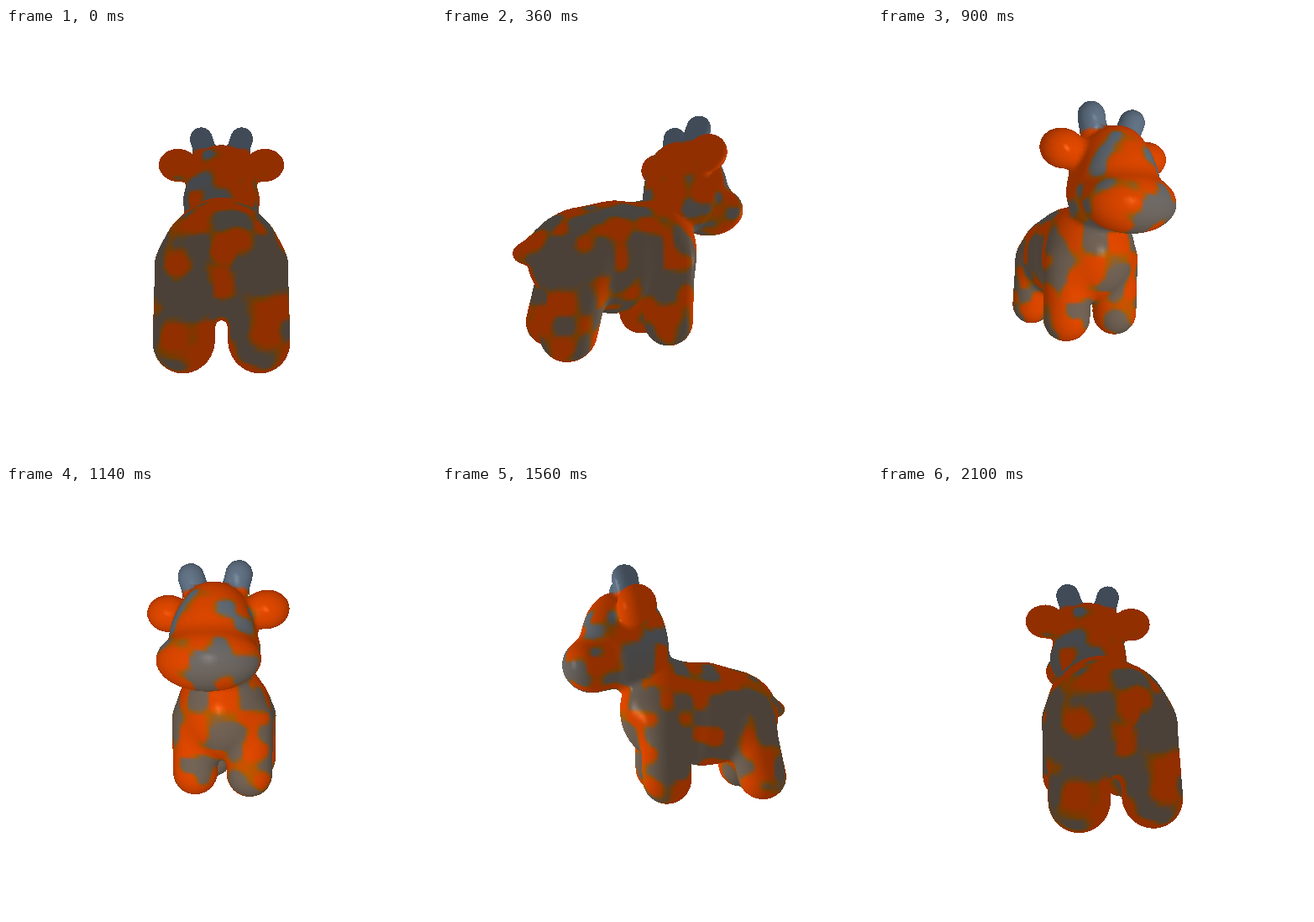
An HTML page with a canvas that plays this animation: 512 by 512 pixels, repeating every 2.16 s.

```html
<!DOCTYPE html>
<html lang="en">
<head>
<meta charset="utf-8">
<title>Turning cow</title>
<style>
html, body { margin: 0; width: 100%; height: 100%; overflow: hidden; background: #fff; }
canvas { display: block; width: 512px; height: 512px; }
</style>
</head>
<body>
<canvas id="stage" width="512" height="512"></canvas>
<script>
const SIZE = 512, MID = 256, FOCAL = 443.4, DIST = 2.7;
const STEP_MS = 60, STEPS = 36;
const { sin, cos, sqrt, abs, min, max, floor, ceil, hypot, PI } = Math;

// Distance to an ellipsoid at height cy and depth cz; cx moves it sideways.
function ball(cy, cz, rx, ry, rz, cx = 0) {
  return (x, y, z) => {
    const a = (x - cx) / rx, b = (y - cy) / ry, c = (z - cz) / rz;
    const k = sqrt(a * a + b * b + c * c);
    const u = a / rx, v = b / ry, w = c / rz;
    return k * (k - 1) / (sqrt(u * u + v * v + w * w) + 1e-9);
  };
}

// Distance to a round rod between two points.
function rod([ax, ay, az], [bx, by, bz], r) {
  const ux = bx - ax, uy = by - ay, uz = bz - az;
  const len2 = ux * ux + uy * uy + uz * uz;
  return (x, y, z) => {
    const px = x - ax, py = y - ay, pz = z - az;
    const t = max(0, min(1, (px * ux + py * uy + pz * uz) / len2));
    const dx = px - ux * t, dy = py - uy * t, dz = pz - uz * t;
    return sqrt(dx * dx + dy * dy + dz * dz) - r;
  };
}

const leg = (hip, foot) => rod([.205, -.14, hip], [.2, -.52, foot], .165);

// x to the cow's right, y up, z towards the nose; the shape is mirrored in x.
const rump = ball(-.1, -.52, .355, .34, .38);
const waist = ball(-.09, -.33, .35, .38, .35);
const chest = ball(-.06, -.07, .34, .37, .34);
const neck = ball(.35, .12, .24, .25, .2);
const skull = ball(.5, .21, .26, .26, .26);
const brow = ball(.55, .31, .21, .21, .19);
const cheeks = ball(.33, .23, .3, .25, .26);
const bridge = ball(.4, .36, .27, .26, .19);
const muzzle = ball(.25, .465, .32, .19, .205);
const ear = ball(.605, .19, .15, .125, .125, .335);
const tail = rod([0, .06, -.75], [0, -.06, -.93], .06);
const horn = rod([.12, .7, .22], [.16, .825, .25], .09);
const parts = [rump, waist, chest, neck, skull, brow, cheeks, bridge, muzzle, ear,
  leg(-.02, -.03), leg(-.62, -.71), tail];

function blend(a, b, k) {
  const h = max(k - abs(a - b), 0) / k;
  return min(a, b) - h * h * k / 4;
}

function cow(x, y, z) {
  x = abs(x);
  let d = 9;
  for (const part of parts) d = blend(d, part(x, y, z), .06);
  return blend(d, horn(x, y, z), .02);
}

function normal(x, y, z) {
  const e = .004;
  const n = [
    cow(x + e, y, z) - cow(x - e, y, z),
    cow(x, y + e, z) - cow(x, y - e, z),
    cow(x, y, z + e) - cow(x, y, z - e)
  ];
  const len = hypot(...n) || 1;
  return n.map(v => v / len);
}

// Smooth seeded noise on a lattice, 0 to 1.
function hash(i, j, k) {
  const v = sin(i * 127.1 + j * 311.7 + k * 74.7) * 43758.5453;
  return v - floor(v);
}

function noise(x, y, z) {
  const i = floor(x), j = floor(y), k = floor(z);
  const ease = t => t * t * (3 - 2 * t);
  const u = ease(x - i), v = ease(y - j), w = ease(z - k);
  let sum = 0;
  for (let c = 0; c < 8; c++) {
    const a = c & 1, b = c >> 1 & 1, d = c >> 2;
    sum += hash(i + a, j + b, k + d) * (a ? u : 1 - u) * (b ? v : 1 - v) * (d ? w : 1 - w);
  }
  return sum;
}

// Above zero is warm, below is grey: ears, head and feet are warmer, undersides greyer.
function toneAt(x, y, z, up) {
  if (y > .72 && horn(abs(x), y, z) < .015) return -.3;
  const patch = noise(x * 9 + 40, y * 9 + 40, z * 9 + 40) - .5;
  const place = .4 * abs(y + .1) - .08 + .1 * x + max(0, abs(x) + y - .75);
  return patch + place + .1 * min(0, up);
}

const ORANGE = [145, 47, 0], OLIVE = [114, 60, 0], BROWN = [75, 65, 56], SLATE = [64, 75, 87];
const GREY_END = -.05, OLIVE_AT = .02, ORANGE_START = .12;
const clamp = t => max(0, min(1, t));
const mix = (a, b, t) => a.map((v, i) => v + (b[i] - v) * t);

function colourOf(tone, y) {
  if (tone > OLIVE_AT) return mix(OLIVE, ORANGE, clamp((tone - OLIVE_AT) / (ORANGE_START - OLIVE_AT)));
  const grey = mix(BROWN, SLATE, clamp(y * 1.4));
  return mix(grey, OLIVE, clamp((tone - GREY_END) / (OLIVE_AT - GREY_END)));
}

// Surface mesh: one vertex per crossed grid cell, one quad per crossed grid edge.
const verts = [], tris = [];

function buildMesh() {
  const h = .026, x0 = -.559, y0 = -.76, z0 = -1.06;
  const nx = 44, ny = 68, nz = 70;
  const at = (i, j, k) => (i * ny + j) * nz + k;
  const field = new Float32Array(nx * ny * nz);
  const ids = new Int32Array(nx * ny * nz).fill(-1);
  for (let i = 0; i < nx; i++)
    for (let j = 0; j < ny; j++)
      for (let k = 0; k < nz; k++)
        field[at(i, j, k)] = cow(x0 + i * h, y0 + j * h, z0 + k * h);

  function vertex(i, j, k) {
    const id = at(i, j, k);
    if (ids[id] >= 0) return ids[id];
    let x = x0 + (i + .5) * h, y = y0 + (j + .5) * h, z = z0 + (k + .5) * h, n;
    for (let s = 0; s < 3; s++) {
      n = normal(x, y, z);
      const d = max(-h, min(h, cow(x, y, z)));
      x -= n[0] * d; y -= n[1] * d; z -= n[2] * d;
    }
    n = normal(x, y, z);
    const lz = 3 - z, len = hypot(x, y, lz);
    const l = [-x / len, -y / len, lz / len];
    const facing = n[0] * l[0] + n[1] * l[1] + n[2] * l[2];
    const light = 1 + .55 * max(0, facing);
    verts.push({
      x, y, z, facing,
      bounce: n.map((v, m) => 2 * facing * v - l[m]),
      rgb: colourOf(toneAt(x, y, z, n[1]), y).map(v => v * light),
      sx: 0, sy: 0, inv: 0, shine: 0
    });
    return ids[id] = verts.length - 1;
  }

  function quad(a, b, c, d) { tris.push([a, b, c], [a, c, d]); }

  for (let i = 1; i < nx - 1; i++)
    for (let j = 1; j < ny - 1; j++)
      for (let k = 1; k < nz - 1; k++) {
        const inside = field[at(i, j, k)] < 0;
        if (inside !== field[at(i + 1, j, k)] < 0)
          quad(vertex(i, j, k), vertex(i, j - 1, k), vertex(i, j - 1, k - 1), vertex(i, j, k - 1));
        if (inside !== field[at(i, j + 1, k)] < 0)
          quad(vertex(i, j, k), vertex(i - 1, j, k), vertex(i - 1, j, k - 1), vertex(i, j, k - 1));
        if (inside !== field[at(i, j, k + 1)] < 0)
          quad(vertex(i, j, k), vertex(i - 1, j, k), vertex(i - 1, j - 1, k), vertex(i, j - 1, k));
      }
}

const ctx = document.getElementById('stage').getContext('2d');
const image = ctx.createImageData(SIZE, SIZE);
const pixels = image.data;
const nearBuf = new Float32Array(SIZE * SIZE);

function fillTri(a, b, c) {
  const area = (b.sx - a.sx) * (c.sy - a.sy) - (b.sy - a.sy) * (c.sx - a.sx);
  if (abs(area) < 1e-6) return;
  const left = ceil(min(a.sx, b.sx, c.sx)), right = floor(max(a.sx, b.sx, c.sx));
  const top = ceil(min(a.sy, b.sy, c.sy)), bottom = floor(max(a.sy, b.sy, c.sy));
  for (let y = top; y <= bottom; y++)
    for (let x = left; x <= right; x++) {
      const u = ((b.sx - x) * (c.sy - y) - (b.sy - y) * (c.sx - x)) / area;
      const v = ((c.sx - x) * (a.sy - y) - (c.sy - y) * (a.sx - x)) / area;
      const w = 1 - u - v;
      if (u < -1e-6 || v < -1e-6 || w < -1e-6) continue;
      const inv = u * a.inv + v * b.inv + w * c.inv;
      const at = y * SIZE + x;
      if (inv <= nearBuf[at]) continue;
      nearBuf[at] = inv;
      const shine = u * a.shine + v * b.shine + w * c.shine;
      for (let m = 0; m < 3; m++)
        pixels[at * 4 + m] = u * a.rgb[m] + v * b.rgb[m] + w * c.rgb[m] + shine;
    }
}

function draw(step) {
  const a = step / STEPS * 2 * PI, c = cos(a), s = sin(a);
  const eyeX = DIST * s, eyeZ = -DIST * c;
  for (const p of verts) {
    p.inv = 1 / (DIST + p.z * c - p.x * s);
    p.sx = MID + FOCAL * (p.x * c + p.z * s) * p.inv;
    p.sy = MID - FOCAL * p.y * p.inv;
    const vx = eyeX - p.x, vy = -p.y, vz = eyeZ - p.z;
    const [bx, by, bz] = p.bounce;
    const glint = (vx * bx + vy * by + vz * bz) / sqrt(vx * vx + vy * vy + vz * vz);
    p.shine = p.facing > 0 && glint > .8 ? 40 * glint ** 64 : 0;
  }
  pixels.fill(255);
  nearBuf.fill(0);
  for (const [i, j, k] of tris) fillTri(verts[i], verts[j], verts[k]);
  ctx.putImageData(image, 0, 0);
}

let shown = -1;
function tick() {
  const step = floor(performance.now() / STEP_MS) % STEPS;
  if (step !== shown) draw(shown = step);
  requestAnimationFrame(tick);
}

buildMesh();
tick();
</script>
</body>
</html>
```
